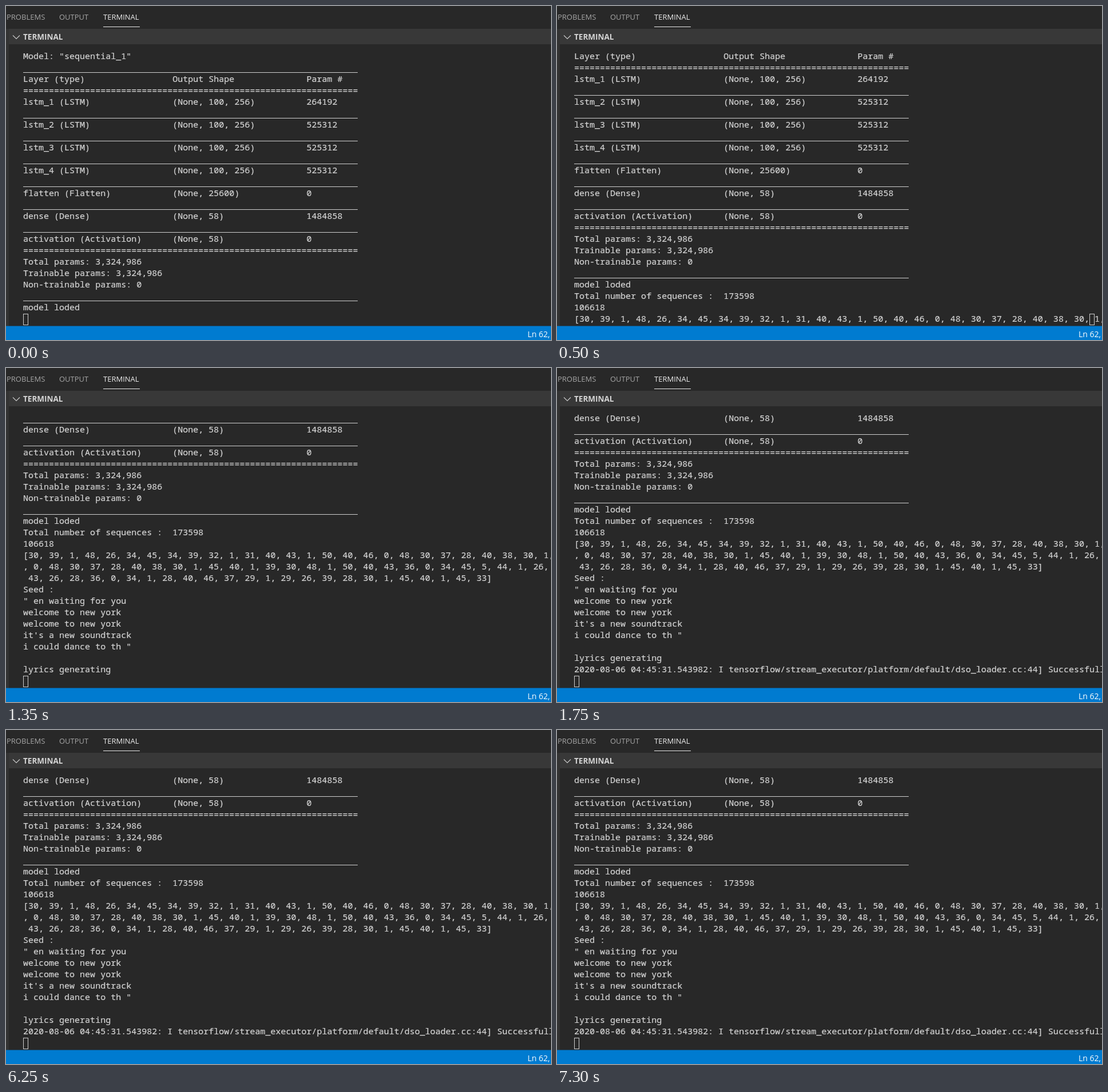
Recreate the animation shown at these times as an HTML page. Size 953 by 585 pixels, loop 8000 ms.

```html
<!DOCTYPE html>
<html lang="en">
<head>
<meta charset="utf-8">
<title>Terminal</title>
<style>
  html, body { margin: 0; width: 100%; height: 100%; overflow: hidden; background: #282828; }
  body { position: relative; font-family: "Open Sans", "Noto Sans", sans-serif; }
  body > * { position: absolute; }

  .chrome { inset: 0; width: 953px; height: 585px; font-size: 13px; fill: #a6a6a6; }
  .chrome .active { fill: #ededed; }
  .chrome .title { fill: #d4d4d4; font-size: 13.5px; font-weight: 700; }
  .chrome .status { fill: #fff; font-size: 14px; }

  .screen {
    left: 30px; top: 77px; width: 923px; height: 462px; overflow: hidden;
    animation: reveal 8s step-end infinite;
  }
  .log {
    margin: 0; color: #d4d4d4; white-space: pre;
    font: 15.02px/20px "Noto Sans Mono", "DejaVu Sans Mono", monospace;
    font-variant-ligatures: none;
    -webkit-text-stroke: 0.2px;
    animation: scroll 8s step-end infinite;
  }
  .log div { height: 20px; }
  .log i {
    display: inline-block; width: 585px; height: 1px;
    vertical-align: -4px; background: #cfcfcf;
  }
  .cursor {
    left: 30px; top: 539px; width: 9px; height: 20px; box-sizing: border-box;
    border: 1px solid #cfcfcf;
    animation: caret 8s step-end infinite;
  }

  @keyframes scroll {
    0% { transform: translateY(0); }
    6.25% { transform: translateY(-40px); }
    9.375% { transform: translateY(-260px); }
    21.875%, 100% { transform: translateY(-280px); }
  }
  /* The bottom row holds text only while the number list is being printed. */
  @keyframes reveal {
    0% { height: 462px; }
    6.25% { height: 483px; }
    9.375%, 100% { height: 462px; }
  }
  @keyframes caret {
    0% { transform: none; }
    6.25% { transform: translateX(901px); }
    9.375%, 100% { transform: none; }
  }
</style>
</head>
<body>
<svg class="chrome" viewBox="0 0 953 585">
  <text x="1" y="24">PROBLEMS</text>
  <text x="93" y="24">OUTPUT</text>
  <text x="170" y="24" class="active">TERMINAL</text>
  <rect x="170" y="36" width="64" height="1" class="active"/>
  <rect y="40" width="5" height="521" fill="#333"/>
  <rect x="5" y="40" width="948" height="27" fill="#383838"/>
  <path d="M12 51.5l6 6 6-6" fill="none" stroke="#c8c8c8" stroke-width="1.2"/>
  <text x="30" y="59" class="title">TERMINAL</text>
  <rect y="560.5" width="953" height="24.5" fill="#007bd0"/>
  <text x="912" y="580" class="status">Ln 62,</text>
</svg>
<div class="screen"><div class="log"></div></div>
<div class="cursor"></div>

<script>
  const RULE = '<i></i>';
  const DOUBLE = '='.repeat(65);
  const row = (layer, shape, params) => layer.padEnd(29) + shape.padEnd(26) + params;

  const layers = [
    row('lstm_1 (LSTM)', '(None, 100, 256)', '264192'),
    row('lstm_2 (LSTM)', '(None, 100, 256)', '525312'),
    row('lstm_3 (LSTM)', '(None, 100, 256)', '525312'),
    row('lstm_4 (LSTM)', '(None, 100, 256)', '525312'),
    row('flatten (Flatten)', '(None, 25600)', '0'),
    row('dense (Dense)', '(None, 58)', '1484858'),
    row('activation (Activation)', '(None, 58)', '0'),
  ];

  const lines = [
    'Model: "sequential_1"',
    RULE,
    row('Layer (type)', 'Output Shape', 'Param #'),
    DOUBLE,
    ...layers.flatMap((layer, i) => i ? [RULE, layer] : [layer]),
    DOUBLE,
    'Total params: 3,324,986',
    'Trainable params: 3,324,986',
    'Non-trainable params: 0',
    RULE,
    'model loded',
    'Total number of sequences :  173598',
    '106618',
    '[30, 39, 1, 48, 26, 34, 45, 34, 39, 32, 1, 31, 40, 43, 1, 50, 40, 46, 0, 48, 30, 37, 28, 40, 38, 30, 1,',
    ', 0, 48, 30, 37, 28, 40, 38, 30, 1, 45, 40, 1, 39, 30, 48, 1, 50, 40, 43, 36, 0, 34, 45, 5, 44, 1, 26,',
    ' 43, 26, 28, 36, 0, 34, 1, 28, 40, 46, 37, 29, 1, 29, 26, 39, 28, 30, 1, 45, 40, 1, 45, 33]',
    'Seed :',
    '" en waiting for you',
    'welcome to new york',
    'welcome to new york',
    "it's a new soundtrack",
    'i could dance to th "',
    '',
    'lyrics generating',
    '2020-08-06 04:45:31.543982: I tensorflow/stream_executor/platform/default/dso_loader.cc:44] Successfully',
  ];

  document.querySelector('.log').innerHTML = lines.map(line => `<div>${line}</div>`).join('');
</script>
</body>
</html>
```
